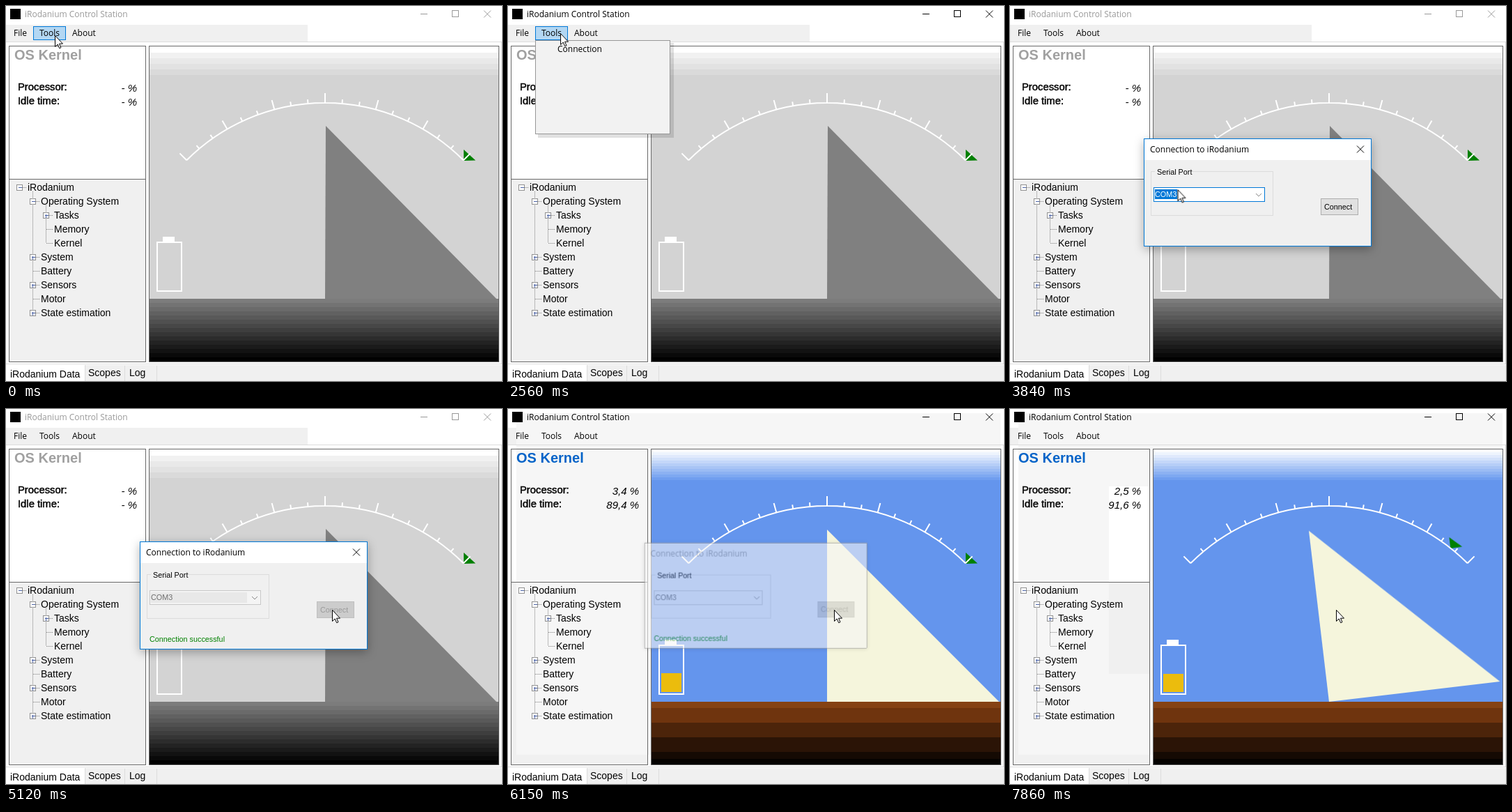
An HTML page for the animation above (8000 ms loop, 712x538 px).

```html
<!DOCTYPE html>
<html lang="en">
<head>
<meta charset="utf-8">
<title>iRodanium Control Station</title>
<style>
html, body { margin: 0; width: 100%; height: 100%; overflow: hidden; background: #fff; }
svg { display: block; width: 712px; height: 538px; }
text { font-family: "Liberation Sans", Arial, sans-serif; font-size: 14px; white-space: pre; }
.ui { font-family: "Open Sans", "Noto Sans", sans-serif; font-size: 12px; }
.small text { font-size: 10.8px; }
.label text { font-size: 14.8px; stroke: #000; stroke-width: .45px; }
.value text { font-size: 15px; font-style: italic; text-anchor: end; }
.head { font-size: 20px; font-weight: bold; }
.crisp, .crisp * { shape-rendering: crispEdges; }
.line { fill: none; stroke: #fff; stroke-width: 2; }

/* one shared 8 s clock; 1% = 80 ms */
.a { animation: 8s step-end infinite; }
.idle { animation-name: idle; }
.live { animation-name: live; }
.first { animation-name: first; }
.second { animation-name: second; }
.caption { animation-name: caption; }
.hover { animation-name: hover; }
.menu { animation-name: menu; animation-timing-function: linear; }
.item { animation-name: item; }
.ready { animation-name: ready; }
.busy { animation-name: busy; }
.done { animation-name: done; }
.tilt { animation-name: tilt; transform-origin: 458px 420px; }
.dialog { animation-name: dialog; animation-timing-function: linear; transform-origin: 355.5px 267.5px; }
.shadow { animation-name: shadow; }
.cursor { animation-name: cursor; animation-timing-function: linear; }

@keyframes idle { 0% { opacity: 1 } 75.375% { opacity: 0 } 100% { opacity: 0 } }
@keyframes live { 0% { opacity: 0 } 75.375% { opacity: 1 } 100% { opacity: 1 } }
@keyframes first { 0% { opacity: 0 } 75.375% { opacity: 1 } 86.875%, 100% { opacity: 0 } }
@keyframes second { 0% { opacity: 0 } 86.875%, 100% { opacity: 1 } }
@keyframes caption {
  0% { color: #999 } 12.375% { color: #000 } 37.625% { color: #999 } 75.375%, 100% { color: #000 }
}
@keyframes hover {
  0% { opacity: 1 } 21.25% { opacity: 0 } 23.125% { opacity: 1 } 37.625%, 100% { opacity: 0 }
}
@keyframes menu {
  0%, 25% { opacity: 0 } 27.375%, 37.6% { opacity: 1 } 37.625%, 100% { opacity: 0 }
}
@keyframes item { 0% { opacity: 0 } 34% { opacity: 1 } 37.625%, 100% { opacity: 0 } }
@keyframes ready { 0% { opacity: 1 } 54.5%, 100% { opacity: 0 } }
@keyframes busy { 0% { opacity: 0 } 54.5%, 100% { opacity: 1 } }
@keyframes done { 0% { opacity: 0 } 58.25%, 100% { opacity: 1 } }
@keyframes tilt {
  0% { transform: rotate(0deg) }
  91.875% { transform: rotate(-.1deg) }
  92.625% { transform: rotate(-.3deg) }
  94.5% { transform: rotate(-1.4deg) }
  96.375% { transform: rotate(-4.4deg) }
  98.25%, 100% { transform: rotate(-6.75deg) }
}
@keyframes dialog {
  0%, 37.624% { opacity: 0; transform: scale(.95) }
  37.625% { opacity: .15; transform: scale(.95) }
  38.75% { opacity: .62; transform: scale(.987) }
  40.5%, 76.1% { opacity: 1; transform: none }
  77.874% { opacity: .1; transform: scale(.95) }
  77.875%, 100% { opacity: 0; transform: scale(.95) }
}
@keyframes shadow {
  0% { filter: drop-shadow(0 4px 7px rgba(0,0,0,.3)) }
  75.375%, 100% { filter: drop-shadow(0 1px 3px rgba(0,0,0,.2)) }
}
@keyframes cursor {
  0%, 21.24% { transform: translate(70px, 42px) }
  21.25%, 22.375% { transform: translate(68px, 54px) }
  24.5%, 32% { transform: translate(75px, 39px) }
  35.375%, 40% { transform: translate(76px, 53px) }
  47.25%, 48% { transform: translate(239px, 263px) }
  50% { transform: translate(477px, 294px) }
  50.625%, 63.25% { transform: translate(477px, 291px) }
  64%, 100% { transform: translate(468px, 288px) }
}
</style>
</head>
<body>
<svg viewBox="0 0 712 538">
  <!-- window surfaces -->
  <g class="crisp">
    <path fill="#fff" d="M0 0h712v538H0z"/>
    <path fill="#f0f0f0" d="M0 27h433v24H0zM5 249h195v261H5zM114 515h598v23H114z"/>
    <g class="a live">
      <path fill="#f6f6f6" d="M12 6h695v490H12z"/>
    </g>
    <g class="a second">
      <path fill="#fff" d="M142 111h58v137h-58z"/>
      <path fill="#f0f0f0" d="M142 249h58v131h-58z"/>
    </g>
    <path fill="none" stroke="#dcdcdc" d="M0 51.5h712M711.5 51v463M0 513.5h712M113.5 515v23M170.5 516v22M216.5 516v22"/>
    <path fill="none" stroke="#696969" d="M4.5 57.5h196v453h-196zM5 248.5h195"/>
  </g>

  <!-- title bar and menu bar -->
  <path d="M6 4h15v15H6z"/>
  <g class="a caption">
    <text class="ui" x="27" y="16" fill="currentColor">iRodanium Control Station</text>
    <g fill="none" stroke="currentColor">
      <path class="crisp" d="M595 11.5h10M640.5 6.5h9v9h-9z"/>
      <path d="M686 6.5l10 10m0-10l-10 10"/>
    </g>
  </g>
  <g class="a hover crisp"><path fill="#b3d7f3" stroke="#0078d7" d="M39.5 29.5h46v19h-46z"/></g>
  <text class="ui" x="11" y="43">File</text>
  <text class="ui" x="48" y="43">Tools</text>
  <text class="ui" x="95" y="43">About</text>

  <!-- data panel -->
  <text class="head a idle" x="12" y="77" fill="#a0a0a0">OS Kernel</text>
  <text class="head a live" x="12" y="77" fill="#0563c8">OS Kernel</text>
  <g class="label">
    <text x="17" y="121">Processor:</text>
    <text x="17" y="141">Idle time:</text>
  </g>
  <g class="value">
    <g class="a idle"><text x="188" y="123">- %</text><text x="188" y="143">- %</text></g>
    <g class="a first"><text x="188" y="123">3,4 %</text><text x="188" y="143">89,4 %</text></g>
    <g class="a second"><text x="188" y="123">2,5 %</text><text x="188" y="143">91,6 %</text></g>
  </g>
  <g id="tree"></g>
  <text x="6" y="533">iRodanium Data</text>
  <text x="118" y="531">Scopes</text>
  <text x="177" y="531">Log</text>

  <!-- scene -->
  <g class="a idle">
    <g id="grey" class="crisp"></g>
    <path fill="#808080" d="M459 172L704 420H458z"/>
  </g>
  <g class="a live">
    <g id="colour" class="crisp"></g>
    <path class="a tilt" fill="#f5f5dc" d="M458 173L705 420H458z"/>
    <path class="a first crisp" fill="#ebbc0d" d="M220 379h29v27h-29z"/>
    <path class="a second crisp" fill="#ebbc0d" d="M220 380h29v26h-29z"/>
  </g>
  <path class="a tilt" fill="#008000" d="M657 206L674 221.500L657 222z"/>
  <path id="dial" class="line"/>
  <g class="crisp">
    <path class="line" d="M217 339h35v70h-35z"/>
    <path fill="#fff" d="M225 331h17v8h-17z"/>
    <path fill="none" stroke="#696969" d="M205.500 57.500h502v453h-502z"/>
  </g>

  <!-- tools menu -->
  <g class="a menu">
    <path fill="#000" opacity=".12" d="M43 53h195v136H43z"/>
    <path class="crisp" fill="#f2f2f2" stroke="#979797" d="M39.500 49.500h193v134h-193z"/>
    <path class="a item crisp" fill="#b3d7f3" stroke="#0078d7" d="M41.500 51.500h190v20h-190z"/>
    <text class="ui" x="71" y="66">Connection</text>
  </g>

  <!-- connection dialog -->
  <g class="a dialog">
    <g class="a shadow"><path fill="#f0f0f0" d="M192 190h327v155H192z"/></g>
    <g class="a idle crisp">
      <path fill="#fff" d="M193 191h325v30H193z"/>
      <path fill="none" stroke="#0078d7" d="M192.500 190.500h326v154h-326z"/>
    </g>
    <path class="a live crisp" fill="#f5f5f5" stroke="#8c8c8c" d="M192.500 190.500h326v154h-326z"/>
    <g class="a idle">
      <text class="ui" x="201" y="210">Connection to iRodanium</text>
      <path fill="none" stroke="#000" d="M498 200.500l10 10m0-10l-10 10"/>
    </g>
    <text class="ui a live" x="201" y="210" fill="#999">Connection to iRodanium</text>
    <path class="crisp" fill="none" stroke="#dcdcdc" d="M208 237.500h-5.500v63h175v-63H261"/>
    <g class="small">
      <text x="211" y="242">Serial Port</text>
      <g class="a ready">
        <path class="crisp" fill="#fff" stroke="#0078d7" d="M206.500 260.500h159v20h-159z"/>
        <path fill="#0078d7" d="M208 263h32v14h-32z"/>
        <text x="208" y="274" fill="#fff">COM3</text>
        <path class="crisp" fill="#e1e1e1" stroke="#adadad" d="M446.500 276.500h53v23h-53z"/>
        <text x="451" y="292">Connect</text>
      </g>
      <g class="a busy">
        <path class="crisp" fill="#f4f4f4" stroke="#c8c8c8" d="M206.500 260.500h159v20h-159z"/>
        <path class="a idle" fill="#e8e8e8" d="M208 263h138v15H208z"/>
        <text x="208" y="274" fill="#6d6d6d">COM3</text>
        <path class="crisp" fill="#ccc" stroke="#bfbfbf" d="M446.500 276.500h53v23h-53z"/>
        <text x="451" y="292" fill="#9a9a9a">Connect</text>
      </g>
      <path fill="none" stroke="#888" d="M353 269l4 4 4-4"/>
      <text class="a done" x="206" y="334" fill="#008000">Connection successful</text>
    </g>
  </g>

  <path class="a cursor" fill="#fff" stroke="#000" d="M.5 .5v16l3.700-3.500 2.500 5.700 2.300-1-2.500-5.500h5z"/>
</svg>
<script>
const $ = id => document.getElementById(id);
const add = (id, html) => $(id).insertAdjacentHTML('beforeend', html);
const band = (id, y, h, c) => add(id, `<rect x="206" y="${y}" width="501" height="${h}" fill="${c}"/>`);

// n equal stripes blending from one colour to another
function bands(id, top, h, n, from, to) {
  for (let i = 0; i < n; i++) {
    const c = from.map((v, k) => Math.round(v + (to[k] - v) * i / (n - 1)));
    band(id, top + i * h, h, `rgb(${c})`);
  }
}

band('grey', 58, 362, '#d3d3d3');
band('grey', 58, 9, '#fff');
bands('grey', 67, 8, 4, [241, 241, 241], [218, 218, 218]);
bands('grey', 420, 6, 15, [124, 124, 124], [0, 0, 0]);

band('colour', 58, 362, '#6495ed');
bands('colour', 58, 4, 11, [252, 253, 255], [112, 158, 239]);
[[420, '#854214'], [429, '#6f340e'], [450, '#4c240a'], [471, '#2b1406'], [492, '#150a03'], [502, '#050200']]
  .forEach(([y, c]) => band('colour', y, 510 - y, c));

// dial: 90 degree arc with a tick every 5 degrees
const polar = (r, deg) => {
  const a = deg * Math.PI / 180;
  return `${(458 + r * Math.sin(a)).toFixed(1)} ${(420 - r * Math.cos(a)).toFixed(1)}`;
};
let dial = `M${polar(281, -45)}A281 281 0 0 1 ${polar(281, 45)}`;
for (let d = -45; d <= 45; d += 5) dial += `M${polar(281, d)}L${polar(d % 15 ? 287 : 295, d)}`;
$('dial').setAttribute('d', dial);

// tree rows: depth, label, expander
add('tree', `<path class="crisp" fill="none" stroke="#808080" stroke-dasharray="1 1"
  d="M38.500 266v174M57.500 286v54"/>`);
[[0, 'iRodanium', '-'], [1, 'Operating System', '-'], [2, 'Tasks', '+'], [2, 'Memory'], [2, 'Kernel'],
 [1, 'System', '+'], [1, 'Battery'], [1, 'Sensors', '+'], [1, 'Motor'], [1, 'State estimation', '+']]
  .forEach(([depth, label, box], i) => {
    const x = 19.5 + depth * 19, y = 260.5 + i * 20;
    add('tree', `<path class="crisp" stroke="#808080" stroke-dasharray="1 1" d="M${x} ${y}h9"/>
      <text x="${x + 11.5}" y="${y + 4.5}">${label}</text>`);
    if (box) add('tree', `<g class="crisp"><rect x="${x - 4}" y="${y - 4}" width="8" height="8" fill="#fff" stroke="#919191"/>
      <path stroke="#4b63a7" d="M${x - 2} ${y}h5${box == '+' ? `M${x} ${y - 2}v5` : ''}"/></g>`);
  });
</script>
</body>
</html>
```
